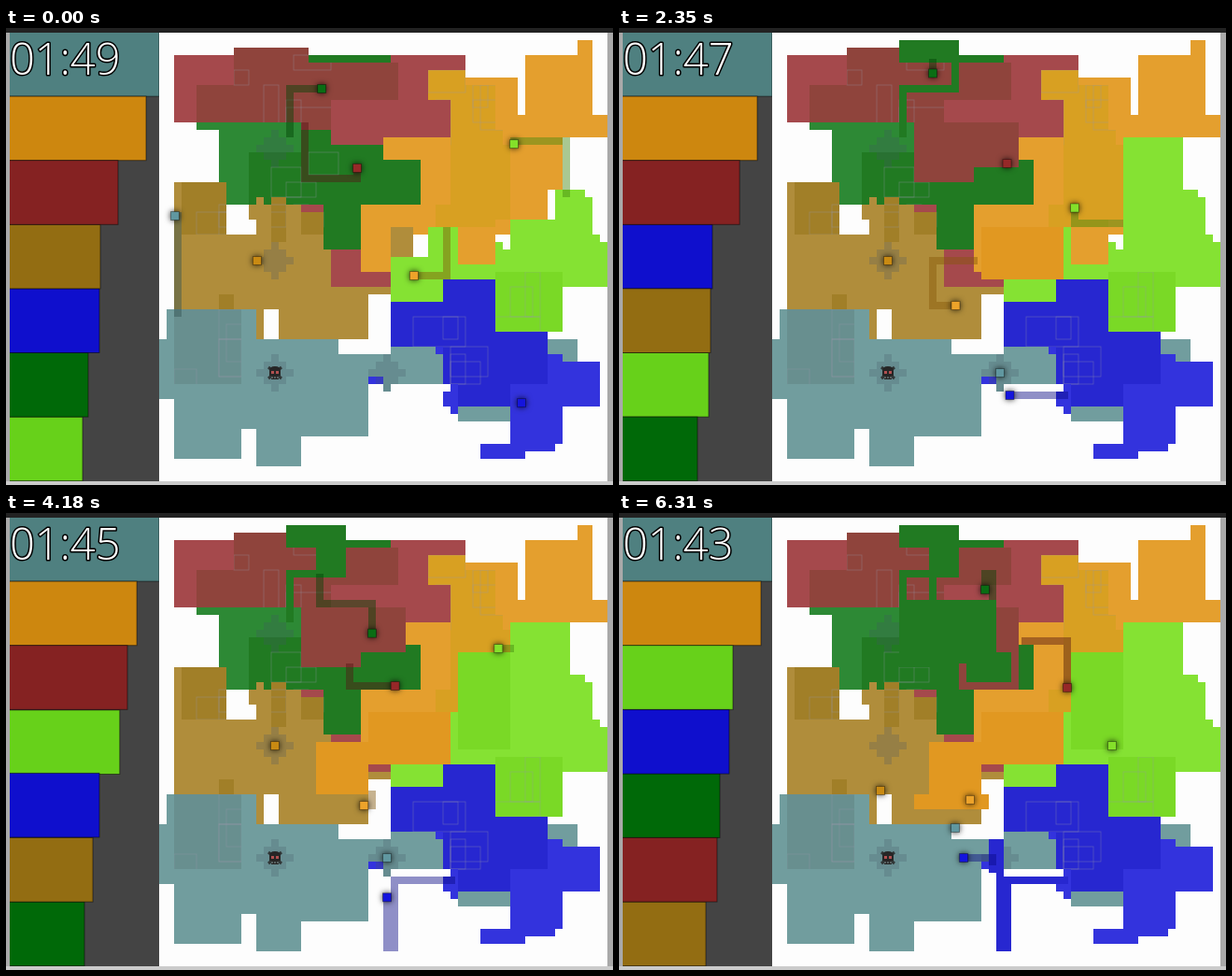
Write an HTML page that moves like this. It is 650 by 489 pixels and loops after 6340 ms.

```html
<!DOCTYPE html>
<html lang="en">
<head>
<meta charset="utf-8">
<title>Territory game</title>
<style>
html, body { margin: 0; width: 100%; height: 100%; overflow: hidden; background: #fdfdfd; }
svg { display: block; width: 650px; height: 489px; }
text { font: 300 47px 'Open Sans', 'Noto Sans', sans-serif; fill: #fff; stroke: #000; stroke-width: 3px; paint-order: stroke; stroke-linejoin: round; }
.player { filter: drop-shadow(0 0 3px rgba(0, 0, 0, .85)); }
</style>
</head>
<body>
<svg id="stage" viewBox="0 0 650 489" xmlns="http://www.w3.org/2000/svg"></svg>
<script>
const LOOP = 6340;
const CELL = 8, LEFT = 164, TOP = 5;
const SPEED = .0806;                        // pixels per ms, the same for every player
const STALLS = [[2640, 140], [5580, 130]];  // the game hangs briefly: [time, length]
const GLIDE = 10;                           // distance in which bars settle by 1 - 1/e
const ROW = 68.6;

/* Outlines are in cells. A route starts in a cell and lists moves: direction and cells,
   W waits, J jumps home. A claim becomes land at its end: the trail's bounding box
   (stretched to the cell in reach) or, with line, just the trail. Distances count from t = 0. */
const teams = {
  teal: {
    bar: '#4f8080', light: '#719d9e', dark: '#688f8f', score: 160,
    land: 'M1 37H13V41H16V36H24V43H31V42H40V47H31V48H30V47H28V54H19V58H13V53H11V57H2V49H0V41H1Z M52 41H56V45H52Z M40 50H47V52H40Z',
    shade: 'M2 37H11V47H2Z',
    player: '#6097a0', start: [2, 37], lead: 107, home: [30, 45], moves: 'U13 L1 U4 J W46 L6 U4',
    claims: [{ from: -107, to: 37, lost: true }]
  },
  blue: {
    bar: '#0f0fcd', light: '#3333dd', dark: '#2727d0', score: 96,
    land: 'M31 36H38V33H45V40H52V43H54V44H59V50H54V55H53V56H49V57H43V55H47V50H40V51H39V50H38V48H39V47H38V43H37V42H31Z M28 46H30V47H28Z',
    shade: 'M31 36H38V33H45V40H52V47H47V50H40V47H38V42H31Z',
    player: '#1414dd', start: [48, 49], lead: 0, moves: 'D3 L8 U4 L9 D9 L1 U14 L1 D5 U3 L5',
    claims: [{ from: 131, to: 420, line: true, gain: 18 }, { from: 452, to: Infinity }]
  },
  green: {
    bar: '#006908', light: '#2d8935', dark: '#217a22', score: 84,
    land: 'M5 12H35V23H27V29H22V23H8V13H5Z M20 3H31V4H20Z',
    shade: 'M12 16H19V12H35V23H27V29H22V23H12Z M20 3H31V4H20Z',
    player: '#0a6d14', start: [17, 13], lead: 82, moves: 'U6 R7 U6 L7 D2 R4 D8 R7 D8 R1 U12 L1 D9',
    claims: [
      { from: -82, to: 54, line: true },
      { from: 62, to: 150, gain: 1 },
      { from: 178, to: 206, reach: [24, 5] },
      { from: 210, to: 238, line: true, late: 366 },
      { from: 238, to: 366, reach: [17, 12], gain: 24, loser: 'red', loss: 25 },
      { from: 438, to: Infinity }
    ]
  },
  brown: {
    bar: '#936d12', light: '#b08d3b', dark: '#a17f28', score: 97,
    land: 'M2 20H9V27H13V25H12V23H13V22H14V23H22V29H23V34H31V35H28V41H16V37H14V41H13V37H2Z M31 26H34V30H31Z',
    shade: 'M3 20H9V27H3Z M15 22H17V28H15Z M19 23H22V27H19Z M8 35H10V37H8Z',
    player: '#c98a12', start: [13, 30], lead: 3, home: [15, 30], moves: 'L8 J W46 D6 L1',
    claims: []
  },
  red: {
    bar: '#852222', light: '#a5494c', dark: '#8f443c', score: 116,
    land: 'M2 3H10V2H20V4H31V3H41V14H30V15H23V13H19V12H2Z M19 23H22V24H19Z M23 29H31V34H23Z',
    shade: 'M10 2H20V4H32V9H23V13H19V12H5V7H10Z',
    player: '#962828', start: [19, 12], lead: 123, moves: 'D7 R7 U4 L3 R8 U3 R1 D5 L7 D5 R7 U6 R7 D9',
    claims: [
      { from: -123, to: 13, gain: 8, loser: 'green', loss: 5 },
      { from: 77, to: 181, gain: 2 },
      { from: 257, to: 375, line: true },
      { from: 392, to: Infinity }
    ]
  },
  orange: {
    bar: '#cd870f', light: '#e49f2e', dark: '#d8a022', score: 146,
    land: 'M36 5H41V6H48V11H49V3H56V1H58V11H60V14H54V21H52V25H47V27H45V31H40V26H38V27H34V26H31V32H27V23H35V17H30V14H39V9H36Z',
    shade: 'M36 5H41V7H45V13H46V15H47V25H45V26H37V23H39V9H36Z',
    player: '#eda32a', start: [38, 26], lead: 83, moves: 'D6 L10 U2 L7 D6 R6 U5 R1 D7 L9 U3 R7 D3', claimed: '#e19821',
    claims: [
      { from: -83, to: 58, gain: 15, loser: 'brown', loss: 3 },
      { from: 73, to: 247, gain: 6, loser: 'brown', loss: 5 },
      { from: 305, to: 397, gain: 12 }
    ]
  },
  lime: {
    bar: '#67d11a', light: '#85e233', dark: '#7ad926', score: 78,
    land: 'M31 30H36V26H40V31H45V28H46V29H47V25H53V21H57V22H58V27H59V28H60V34H54V40H45V33H38V36H31Z',
    shade: 'M45 32H54V40H45Z',
    player: '#84e02a', start: [54, 21], lead: 115, home: [45, 30], moves: 'U7 L7 D11 R2 L9 U7 R8 U1 L9 D6 J',
    claims: [
      { from: -115, to: 96, gain: 14, loser: 'orange', loss: 17, pale: true },
      { from: 125, to: 277, reach: [40, 30], gain: 26, loser: 'orange', loss: 14 },
      { from: 313, to: 421, lost: true }
    ]
  }
};
const barOrder = ['teal', 'orange', 'lime', 'green', 'blue', 'brown', 'red'];

function add(tag, attrs, parent = stage) {
  const node = document.createElementNS('http://www.w3.org/2000/svg', tag);
  for (const key in attrs) node.setAttribute(key, attrs[key]);
  parent.appendChild(node);
  return node;
}
const stage = document.getElementById('stage');
const box = (x, y, width, height, fill) => add('rect', { x, y, width, height, fill });
const centre = ([col, row]) => ({ x: LEFT + CELL * (col + .5), y: TOP + CELL * (row + .5) });

let seed = 7;
const random = () => (seed = seed * 16807 % 2147483647) / 2147483647;

function route({ start, lead, home, moves }) {
  const step = { U: [0, -1], D: [0, 1], L: [-1, 0], R: [1, 0], W: [0, 0] };
  let { x, y } = centre(start), d = -lead;
  const points = [{ x, y, d }];
  for (const move of moves.split(' ')) {
    if (move === 'J') ({ x, y } = centre(home));
    else {
      const length = CELL * move.slice(1), [dx, dy] = step[move[0]];
      x += dx * length;
      y += dy * length;
      d += length;
    }
    points.push({ x, y, d });
  }
  return points;
}

function position(points, d) {
  const i = points.findLastIndex(p => p.d <= d);
  const a = points[Math.max(i, 0)], b = points[i + 1];
  if (!b || i < 0) return a;
  const k = (d - a.d) / (b.d - a.d);
  return { x: a.x + (b.x - a.x) * k, y: a.y + (b.y - a.y) * k };
}

const stretch = (points, from, to) =>
  [position(points, from), ...points.filter(p => p.d > from && p.d < to), position(points, to)];
const pointList = points => points.map(p => `${p.x},${p.y}`).join(' ');

function polyline(stroke, points = []) {
  return add('polyline', { points: pointList(points), fill: 'none', stroke, 'stroke-width': CELL, 'stroke-linecap': 'square' });
}

function claimedLand(team, claim) {
  const points = stretch(team.points, claim.from, claim.to);
  const fill = claim.pale ? team.light : team.claimed || team.dark;
  if (claim.line) return polyline(fill, points);
  if (claim.reach) points.push(centre(claim.reach));
  const snap = (v, origin) => Math.floor((v - origin) / CELL) * CELL + origin;
  const xs = points.map(p => snap(p.x, LEFT)), ys = points.map(p => snap(p.y, TOP));
  const x = Math.min(...xs), y = Math.min(...ys);
  return box(x, y, Math.max(...xs) - x + CELL, Math.max(...ys) - y + CELL, fill);
}

box(0, 0, 650, 489, '#a9a9a9');
box(0, 485, 650, 4, '#cbcbcb');
box(0, 0, 650, 5, '#222');
box(LEFT, TOP, 480, 480, '#fdfdfd');

const grid = add('g', { transform: `translate(${LEFT} ${TOP}) scale(${CELL})` });
for (const [name, team] of Object.entries(teams)) {
  add('path', { d: team.land, fill: team.light }, grid);
  add('path', { d: team.shade, fill: team.dark }, grid);
  // Faint seams of earlier claims
  add('path', { d: team.shade }, add('clipPath', { id: name }, grid));
  const seams = add('g', { 'clip-path': `url(#${name})`, fill: 'none', stroke: '#99a', 'stroke-width': .1, 'stroke-opacity': .4 }, grid);
  const [, x, y] = team.shade.match(/M(\d+) (\d+)/).map(Number);
  for (let i = 0; i < 5; i++) {
    add('rect', {
      x: x + Math.floor(random() * 9), y: y + Math.floor(random() * 9),
      width: 2 + Math.floor(random() * 6), height: 2 + Math.floor(random() * 5)
    }, seams);
  }
}

// Home crosses, one every 15 cells
const cross = 'M-1.5 -1.5H-.5V-2.5H.5V-1.5H1.5V-.5H2.5V.5H1.5V1.5H.5V2.5H-.5V1.5H-1.5V.5H-2.5V-.5H-1.5Z';
for (const [col, row] of [[0, 0], [0, 1], [0, 2], [1, 2]]) {
  add('path', { d: cross, fill: '#456', opacity: .24, transform: `translate(${15.5 + 15 * col} ${15.5 + 15 * row})` }, grid);
}

const claims = Object.values(teams).flatMap(team => {
  team.points = route(team);
  return team.claims.map(claim => ({ ...claim, team, shownAt: claim.late || claim.to }));
}).sort((a, b) => a.shownAt - b.shownAt);
for (const claim of claims) {
  if (!claim.lost && claim.to < Infinity) claim.node = claimedLand(claim.team, claim);
}

// Skull
const skull = add('g', { transform: 'translate(288 369)' });
add('path', { d: 'M-7 -6L7 6M7 -6L-7 6', stroke: '#303636', 'stroke-width': 3 }, skull);
add('path', { d: 'M-6 -2Q-6 -7 0 -7T6 -2V3H4V7H-4V3H-6Z', fill: '#262626' }, skull);
add('path', { d: 'M-4 -2H-1V1H-4ZM1 -2H4V1H1Z', fill: '#b05050' }, skull);
add('path', { d: 'M-3 4V6M0 4V6M3 4V6', stroke: '#899' }, skull);

for (const team of Object.values(teams)) {
  team.trail = polyline(`color-mix(in srgb, ${team.bar} 65%, black)`);
  team.trail.setAttribute('stroke-opacity', .45);
}
for (const team of Object.values(teams)) {
  team.node = add('rect', { x: -4.5, y: -4.5, width: 9, height: 9, fill: team.player, stroke: '#000', 'stroke-opacity': .35, class: 'player' });
}

box(4, 5, 160, 480, '#444');
add('rect', { x: 4, y: 5, width: 160, height: 480 }, add('clipPath', { id: 'side' }));
const side = add('g', { 'clip-path': 'url(#side)' });
for (const name of barOrder) {
  teams[name].barNode = add('rect', { x: 3.5, height: ROW, fill: teams[name].bar, stroke: '#000', 'stroke-opacity': .5 }, side);
}
const clock = add('text', { x: 4, y: 50 });

// Standings after each claim: rows follow the scores.
const scores = Object.fromEntries(barOrder.map(name => [name, teams[name].score]));
function standing(at) {
  const ranking = [...barOrder].sort((a, b) => scores[b] - scores[a]);
  return { at, bars: Object.fromEntries(ranking.map((name, row) => [name, { row, width: Math.min(160, scores[name]) }])) };
}
const standings = [standing(0)];
for (const { team, gain, loser, loss, to } of claims) {
  if (!gain) continue;
  scores[barOrder.find(name => teams[name] === team)] += gain;
  if (loser) scores[loser] -= loss;
  standings.push(standing(to));
}

function glidingBar(name, d) {
  let { row, width } = standings[0].bars[name];
  standings.forEach(({ at, bars }, i) => {
    if (at > d) return;
    const until = Math.min(d, i + 1 < standings.length ? standings[i + 1].at : d);
    const left = Math.exp((at - until) / GLIDE), goal = bars[name];
    row = goal.row + (row - goal.row) * left;
    width = goal.width + (width - goal.width) * left;
  });
  return { row, width };
}

function travelled(t) {
  const stalled = STALLS.reduce((sum, [at, length]) => sum + Math.min(length, Math.max(0, t - at)), 0);
  return SPEED * (t - stalled);
}

function draw(t) {
  const d = travelled(t);
  for (const { node, shownAt } of claims) {
    if (node) node.setAttribute('visibility', d >= shownAt ? 'visible' : 'hidden');
  }
  for (const [name, team] of Object.entries(teams)) {
    const { x, y } = position(team.points, d);
    team.node.setAttribute('transform', `translate(${x} ${y})`);
    const open = team.claims.filter(c => d >= c.from && d < (c.late || c.to));
    const trail = open.length ? stretch(team.points, open[0].from, d) : [];
    team.trail.setAttribute('points', pointList(trail));
    const { row, width } = glidingBar(name, d);
    team.barNode.setAttribute('y', TOP - .5 + row * ROW);
    team.barNode.setAttribute('width', width + .5);
  }
  clock.textContent = '01:' + (49 - Math.floor((t + 85) / 1000));
}

const start = performance.now();
function tick() {
  draw((performance.now() - start) % LOOP);
  requestAnimationFrame(tick);
}
tick();
</script>
</body>
</html>
```
